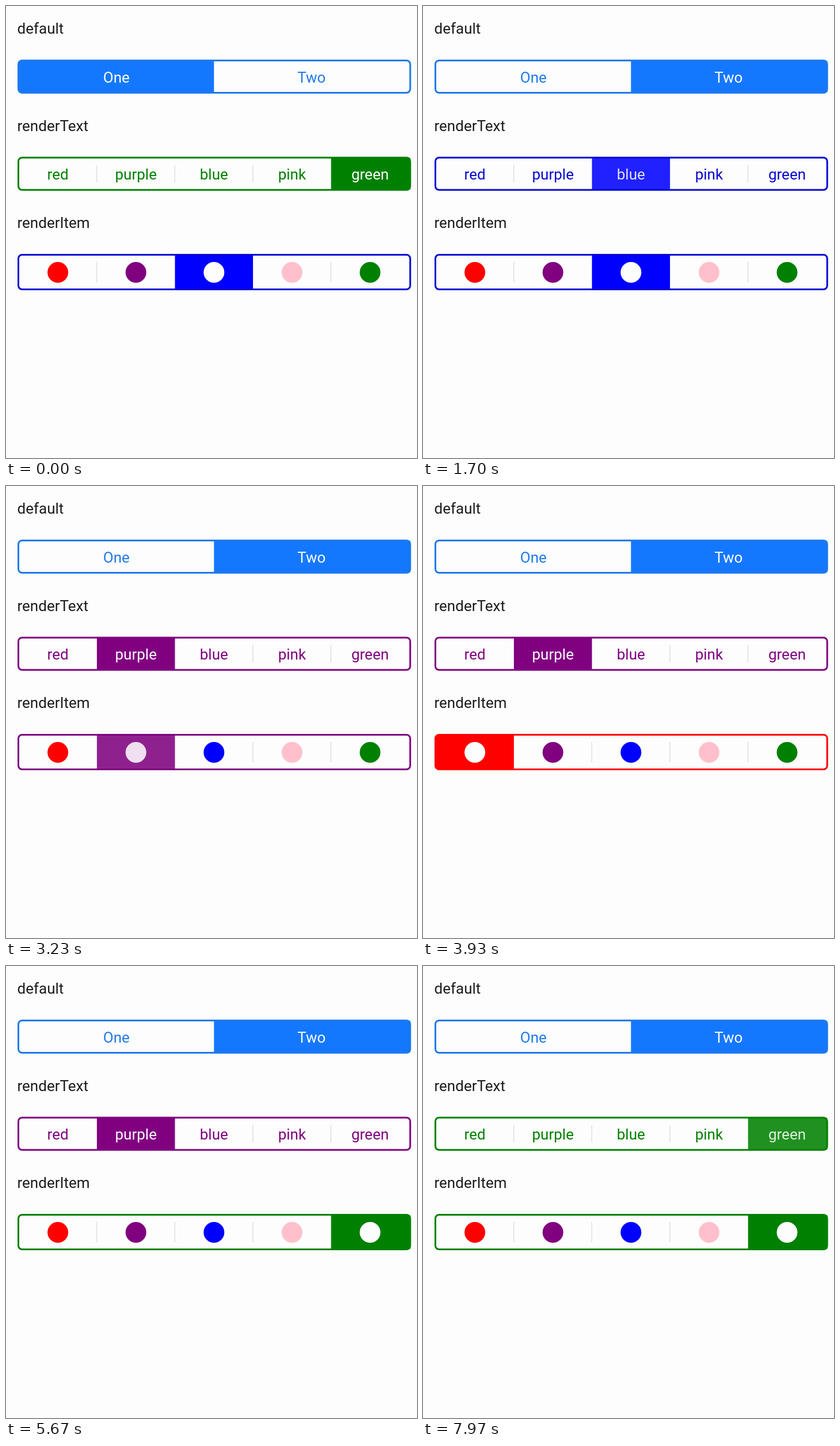
Write an HTML page that moves like this. It is 714 px wide and 784 px high and loops after 8000 ms.

```html
<!DOCTYPE html>
<html lang="en">
<head>
<meta charset="utf-8">
<title>Segmented controls</title>
<style>
  html, body { margin: 0; width: 100%; height: 100%; overflow: hidden; background: #fcfdfc; }
  svg { display: block; width: 714px; height: 784px; }
  text { font: 26px Roboto, sans-serif; }
</style>
</head>
<body>
<svg id="stage" viewBox="0 0 714 784"></svg>
<script>
const LOOP = 8000, LEFT = 22.3, INNER = 678, PAPER = '#fdfdfd';
const stage = document.getElementById('stage');
const names = ['red', 'purple', 'blue', 'pink', 'green'];
const fills = ['#ff0000', '#800080', '#0000ff', '#ffc0cb', '#008000'];
const edges = fills.map(c => c === '#0000ff' ? '#0808d4' : c);

// Each tap: [start ms, selected index, fade length ms]
const rows = [
  { title: 'default', top: 93, height: 59, labels: ['One', 'Two'],
    fills: Array(2).fill('#1478ff'), edges: Array(2).fill('#207ae9'),
    taps: [[0, 0, 0], [900, 1, 100]] },
  { title: 'renderText', top: 261.5, height: 59, labels: names, fills, edges,
    taps: [[0, 4, 0], [1700, 2, 100], [2230, 1, 170], [7000, 3, 230], [7970, 4, 100]] },
  { title: 'renderItem', top: 430, height: 63, dots: true, labels: names, fills, edges,
    taps: [[0, 2, 0], [3230, 1, 70], [3670, 0, 260], [4830, 3, 140], [5570, 4, 100]] }
];

function add(tag, attrs, text) {
  const el = document.createElementNS('http://www.w3.org/2000/svg', tag);
  set(el, attrs);
  if (text) el.textContent = text;
  return stage.appendChild(el);
}

function set(el, attrs) {
  for (const key in attrs) el.setAttribute(key, attrs[key]);
}

function build(row) {
  const { top, height, labels, dots } = row;
  const middle = top + height / 2;
  row.step = INNER / labels.length;
  add('text', { x: 19.5, y: top - 45, fill: '#1c1c1c' }, row.title);
  const inset = dots ? 14 : 14.5;
  row.dividers = labels.slice(1).map((_, i) => add('rect', {
    x: LEFT + (i + 1) * row.step - 1, y: top + inset,
    width: 1.4, height: height - 2 * inset, fill: '#dedede'
  }));
  row.thumb = add('rect', { y: top + 2, height: height - 4 });
  row.items = labels.map((label, i) => {
    const x = LEFT + (i + 0.5) * row.step;
    return dots
      ? add('circle', { cx: x, cy: middle + 0.5, r: 18 })
      : add('text', { x, y: middle + 10, 'text-anchor': 'middle' }, label);
  });
  row.frame = add('rect', {
    x: 21.5, y: top + 1.5, width: 680.7, height: height - 3,
    rx: 6.5, fill: 'none', 'stroke-width': 3
  });
}

function fade(elapsed, length) {
  const p = length ? Math.min(1, elapsed / length) : 1;
  const eased = p < 0.5 ? 2 * p * p : 1 - 2 * (1 - p) ** 2;
  return 0.87 + 0.13 * eased;
}

function draw(row, time) {
  const [start, selected, length] = row.taps.filter(tap => tap[0] <= time).pop();
  const opacity = fade(time - start, length);
  const last = selected === row.labels.length - 1;
  set(row.thumb, {
    x: LEFT + selected * row.step, width: row.step + (last ? 2 : 0),
    fill: row.fills[selected], opacity
  });
  set(row.frame, { stroke: row.edges[selected] });
  row.items.forEach((item, i) => set(item, {
    fill: i === selected ? PAPER : row.dots ? row.fills[i] : row.edges[selected],
    opacity: i === selected ? opacity : 1
  }));
  row.dividers.forEach((line, i) => set(line, {
    opacity: i === selected || i === selected - 1 ? 0 : 1
  }));
}

function tick() {
  const time = (performance.now() - begin) % LOOP;
  rows.forEach(row => draw(row, time));
  requestAnimationFrame(tick);
}

rows.forEach(build);
const begin = performance.now();
tick();
</script>
</body>
</html>
```
